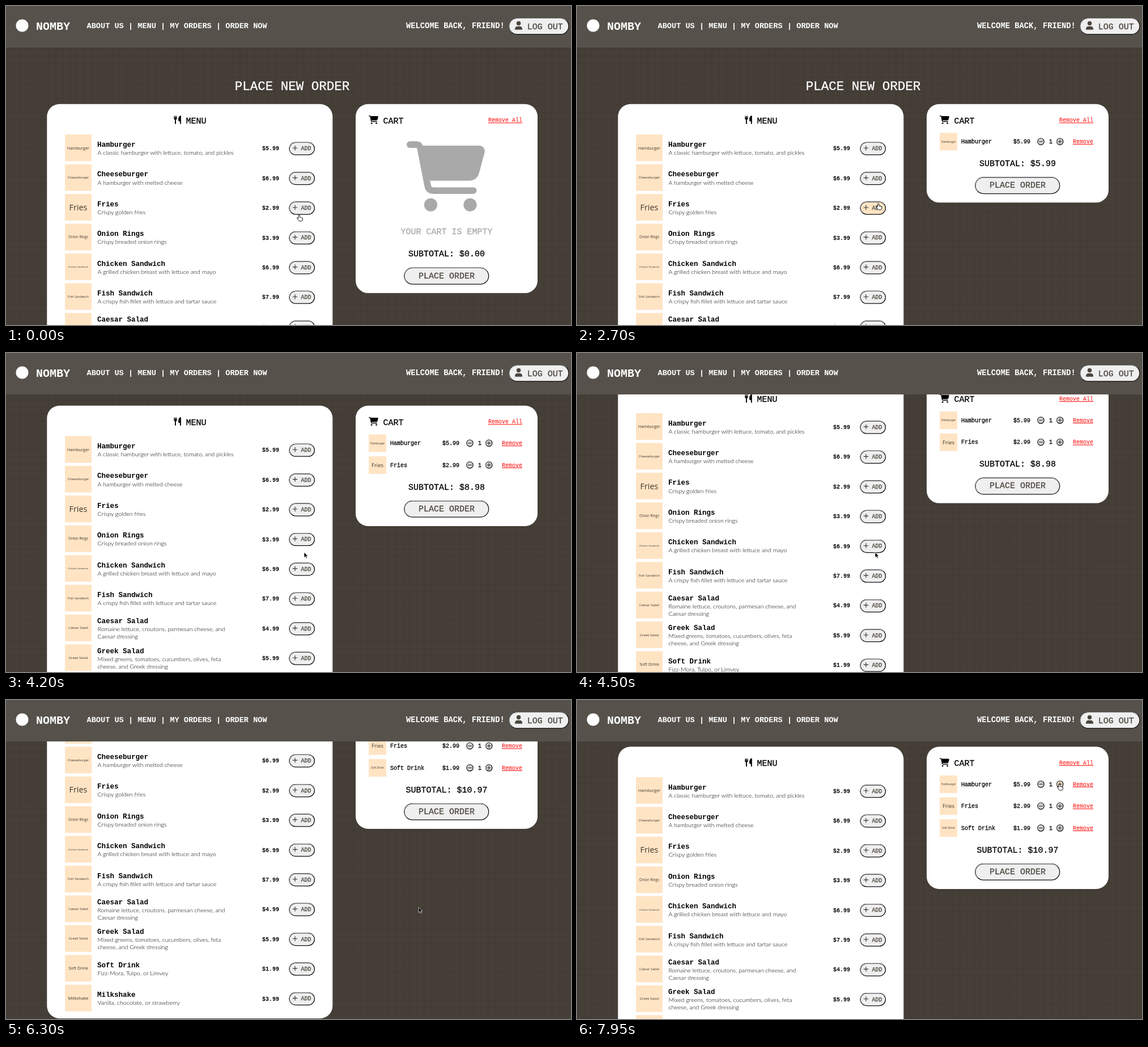
An HTML page for the animation above (8 s loop, 997 by 562 pixels).

```html
<!DOCTYPE html>
<html lang="en">
<head>
<meta charset="utf-8">
<title>Place new order</title>
<style>
  html, body { margin: 0; width: 100%; height: 100%; overflow: hidden; background: #453f38; }
  svg { display: block; width: 100vw; height: 100vh; }
  text { font-family: "Liberation Mono", monospace; white-space: pre; }
  .bold { font-weight: bold; }
  .mid { stroke: currentColor; stroke-width: .3px; }
  .note { font-family: Lato, sans-serif; font-weight: 300; }
  .thumb { font-family: "Open Sans", sans-serif; text-anchor: middle; }
  .center { text-anchor: middle; }
  .link { text-decoration: underline; }
</style>
</head>
<body>
<svg id="stage" viewBox="0 0 997 562"></svg>
<script>
const LOOP = 8000, STEP = 150, ROW = 52.4, CART_ROW = 38.6;
const INK = '#4b463f', BISQUE = '#ffe4c4';

// name, thumbnail font size, price, description lines
const MENU = [
  ['Hamburger', 7.25, 5.99, 'A classic hamburger with lettuce, tomato, and pickles'],
  ['Cheeseburger', 5.8, 6.99, 'A hamburger with melted cheese'],
  ['Fries', 14.4, 2.99, 'Crispy golden fries'],
  ['Onion Rings', 6.2, 3.99, 'Crispy breaded onion rings'],
  ['Chicken Sandwich', 4.3, 6.99, 'A grilled chicken breast with lettuce and mayo'],
  ['Fish Sandwich', 5.6, 7.99, 'A crispy fish fillet with lettuce and tartar sauce'],
  ['Caesar Salad', 5.85, 4.99, 'Romaine lettuce, croutons, parmesan cheese, and', 'Caesar dressing'],
  ['Greek Salad', 6.1, 5.99, 'Mixed greens, tomatoes, cucumbers, olives, feta', 'cheese, and Greek dressing'],
  ['Soft Drink', 7.5, 1.99, 'Fizz-Mora, Tulpo, or Limvey'],
  ['Milkshake', 7.75, 3.99, 'Vanilla, chocolate, or strawberry']
];

const ORDERS = [[2100, 0], [3600, 2], [6000, 8]]; // time, menu index

const SCROLL = [[3750, 0], [3900, 13], [4050, 45], [4200, 80], [4350, 106], [4500, 120.3], [4650, 124],
  [4800, 124], [4950, 150], [5100, 182], [5250, 194], [5400, 196.5], [6450, 196.5], [6600, 130], [6750, 90.5]];

const POINTER = [[600, 517, 368], [900, 520, 335], [1200, 520, 280], [1500, 519, 254], [1650, 519, 254],
  [1800, 521, 256], [2100, 521, 256], [2400, 527, 305], [2700, 531.5, 348], [3000, 528, 351], [3300, 526, 351],
  [5250, 526, 351], [5700, 524, 474], [6000, 524, 474], [6150, 610, 430], [6300, 728, 365], [6900, 728, 365],
  [7050, 745, 335], [7350, 835, 215], [7500, 866, 165], [7650, 872, 143], [7800, 861, 144], [7950, 851, 148]];

// Linear interpolation over [time, ...values] keys
function track(keys, t) {
  const next = keys.findIndex(k => k[0] > t);
  if (next < 0) return keys[keys.length - 1].slice(1);
  if (next === 0) return keys[0].slice(1);
  const a = keys[next - 1], b = keys[next], p = (t - a[0]) / (b[0] - a[0]);
  return a.slice(1).map((v, i) => v + (b[i + 1] - v) * p);
}

const text = (x, y, size, str, cls = '', fill = '#000') =>
  `<text x="${x}" y="${y}" font-size="${size}" class="${cls}" fill="${fill}" color="${fill}">${str}</text>`;
const rect = (x, y, w, h, fill, r = 0) =>
  `<rect x="${x}" y="${y}" width="${w}" height="${h}" rx="${r}" fill="${fill}"/>`;
const circle = (x, y, r, fill) => `<circle cx="${x}" cy="${y}" r="${r}" fill="${fill}"/>`;
const path = (d, fill, extra = '') => `<path d="${d}" fill="${fill}" ${extra}/>`;
const place = (x, y, scale, content) => `<g transform="translate(${x} ${y}) scale(${scale})">${content}</g>`;
const money = v => '$' + v.toFixed(2);

// Rounded button with an outset border: grey on top and left, black below
function pill(x, y, w, h, fill) {
  const r = h / 2 - .6, c = r * .707, left = x + h / 2, right = x + w - h / 2, mid = y + h / 2;
  return rect(x + .6, y + .6, w - 1.2, h - 1.2, fill, r).replace('/>', ' stroke="#111" stroke-width="1.25"/>') +
    path(`M${left - c} ${mid + c}A${r} ${r} 0 0 1 ${left} ${mid - r}H${right}A${r} ${r} 0 0 1 ${right + c} ${mid - c}`,
      'none', 'stroke="#767676" stroke-width="1.25"');
}

const plus = (x, y, s) => path(`M${x - s} ${y}h${2 * s}M${x} ${y - s}v${2 * s}`, 'none', 'stroke="#333" stroke-width="1.15"');
const minus = (x, y, s) => path(`M${x - s} ${y}h${2 * s}`, 'none', 'stroke="#333" stroke-width="1.15"');

const cartIcon = color =>
  path('M24 24H70q24 0 30 26L153 321q6 39 47 39H488', 'none', `stroke="${color}" stroke-width="48" stroke-linecap="round"`) +
  path('M115 32H531c26 0 45 25 39 50L529 235c-9 31-37 53-70 53H160z', color) +
  circle(176, 464, 48, color) + circle(464, 464, 48, color);

const utensilsIcon =
  path('M16 150L32 16H64V150H80L96 16H128L144 150H160V16H192L208 150Q208 230 144 250V480A32 32 0 0 1 80 480V250Q16 230 16 150Z', '#000') +
  path('M448 32V480A32 32 0 0 1 384 480V352H352Q288 352 288 288V208Q288 60 416 0Q448 0 448 32z', '#000');

const userIcon = circle(224, 128, 128, INK) +
  path('M0 482Q0 304 178 304H270Q448 304 448 482Q448 512 418 512H30Q0 512 0 482z', INK);

function thumb(x, y, size, [name, fontSize]) {
  const f = fontSize * size / 47;
  return rect(x, y, size, size, BISQUE) + text(x + size / 2, y + size / 2 + f * .36, f, name, 'thumb', '#40372c');
}

function menuRow(item, i, px, py) {
  const [name, , price, ...lines] = item, y = 226.4 + i * ROW, two = lines.length > 1;
  const hover = px > 502 && px < 543 && py > y + 15.5 && py < y + 34.5;
  const nameY = y + (two ? 15.6 : 21.6), noteY = y + (two ? 29.6 : 35.7);
  return {
    hover,
    svg: thumb(104, y, 47, item) + text(161, nameY, 12.5, name, 'bold') +
      lines.map((l, n) => text(161.5, noteY + n * 12.7, 10.6, l, 'note')).join('') +
      text(452, y + 28, 10, money(price), 'bold') +
      pill(499.5, y + 13.4, 45.5, 23, hover ? BISQUE : '#efefef') +
      plus(510, y + 23.8, 4.2) + text(520.5, y + 27.8, 10, 'ADD', 'mid', INK)
  };
}

function cartRow(item, i, px, py) {
  const y = 223.4 + i * CART_ROW, mid = y + 15.4;
  const hover = Math.hypot(px - 852, py - mid) < 6;
  return {
    hover,
    svg: thumb(640, y, 31, item) + text(678, mid + 3.4, 10, item[0], 'mid') +
      text(770, mid + 3.4, 10, money(item[2]), 'mid') +
      pill(812.2, mid - 6.3, 12.6, 12.6, '#d3d3d3') + minus(818.5, mid, 3.4) +
      text(836, mid + 3.4, 10, 1, 'mid center') +
      pill(845.9, mid - 6.3, 12.6, 12.6, hover ? BISQUE : '#d3d3d3') + plus(852.2, mid, 3.4) +
      text(875, mid + 3.4, 10, 'Remove', 'link', '#f00')
  };
}

const header = rect(0, 0, 997, 73, '#56524b') + circle(28.5, 34.5, 11, '#fff') +
  text(53, 41.8, 20, 'NOMBY', 'bold', '#fff') +
  text(142.5, 39, 13.6, 'ABOUT US | MENU | MY ORDERS | ORDER NOW', 'bold', '#fff') +
  text(706, 39, 13.8, 'WELCOME BACK, FRIEND!', 'bold', '#fff') +
  pill(887, 20.8, 106.5, 29.6, '#efefef') + place(898, 26.8, .0293, userIcon) +
  text(919.7, 40.6, 15, 'LOG OUT', 'mid', INK);

function pointer(x, y, hand) {
  const d = hand
    ? 'M0 0q-1 0-1 1v5l-1-1q-1-.6-1.6.2l2.6 4.3q.6 1.5 2 1.5h3q2.2 0 2.4-2.2v-3q0-1-1-1l-1 .3-1-.7-1 .2-1-.5V1q0-1-1.4-1z'
    : 'M0 0V9.5L2.2 7.4 3.8 10.8 5.4 10 3.9 6.8H6.8z';
  return place(x, y, 1, hand ? path(d, '#fff', 'stroke="#000" stroke-width=".9"')
                             : path(d, '#000', 'stroke="#fff" stroke-width=".7"'));
}

function scene(t) {
  const [scroll] = track(SCROLL, t), [x, y] = track(POINTER, t), docY = y + scroll;
  const cart = ORDERS.filter(o => o[0] <= t).map(o => MENU[o[1]]);
  const rows = MENU.map((item, i) => menuRow(item, i, x, docY));
  const cartRows = cart.map((item, i) => cartRow(item, i, x, docY));
  const shift = cart.length ? (cart.length - 1) * CART_ROW : 159.5;
  const total = cart.reduce((sum, item) => sum + item[2], 0);
  const scrolling = t >= 3900 && t < 5400;
  const hand = t < 750 || !scrolling && [...rows, ...cartRows].some(r => r.hover);

  const empty = place(707, 238.3, .2413, cartIcon('#a9a9a9')) +
    text(777.5, 402.3, 15, 'YOUR CART IS EMPTY', 'center mid', '#a9a9a9');

  return `<defs><pattern id="grid" width="12.5" height="12.5" patternUnits="userSpaceOnUse">
      <path d="M0 .5H12.5M.5 0V12.5" stroke="#3f3932"/></pattern></defs>` +
    rect(0, 0, 997, 562, '#453f38') +
    `<g transform="translate(0 ${-scroll})">` +
    rect(0, 0, 997, 800, 'url(#grid)') +
    text(505, 147.6, 22.5, 'PLACE NEW ORDER', 'center mid', '#fff') +
    rect(72.3, 172.8, 504, 584.7, '#fff', 22) +
    place(295.7, 193, .0293, utensilsIcon) + text(317.5, 206.8, 15, 'MENU', 'mid') +
    rows.map(r => r.svg).join('') +
    rect(617, 172.8, 321, 173.5 + shift, '#fff', 22) +
    place(640, 193, .0293, cartIcon('#000')) + text(665.5, 206.8, 15, 'CART', 'mid') +
    text(851, 204.4, 10, 'Remove All', 'link', '#f00') +
    (cart.length ? cartRows.map(r => r.svg).join('') : empty) +
    text(777.5, 281.9 + shift, 15, 'SUBTOTAL: ' + money(total), 'center mid') +
    pill(702.3, 301.3 + shift, 150, 29.8, '#efefef') +
    text(777.5, 320.2 + shift, 15, 'PLACE ORDER', 'center mid', INK) +
    '</g>' + header + pointer(x, y, hand);
}

const stage = document.getElementById('stage');
let shown = -1;
function tick() {
  const t = Math.floor(performance.now() % LOOP / STEP) * STEP;
  if (t !== shown) stage.innerHTML = scene(shown = t);
  requestAnimationFrame(tick);
}
tick();
</script>
</body>
</html>
```
